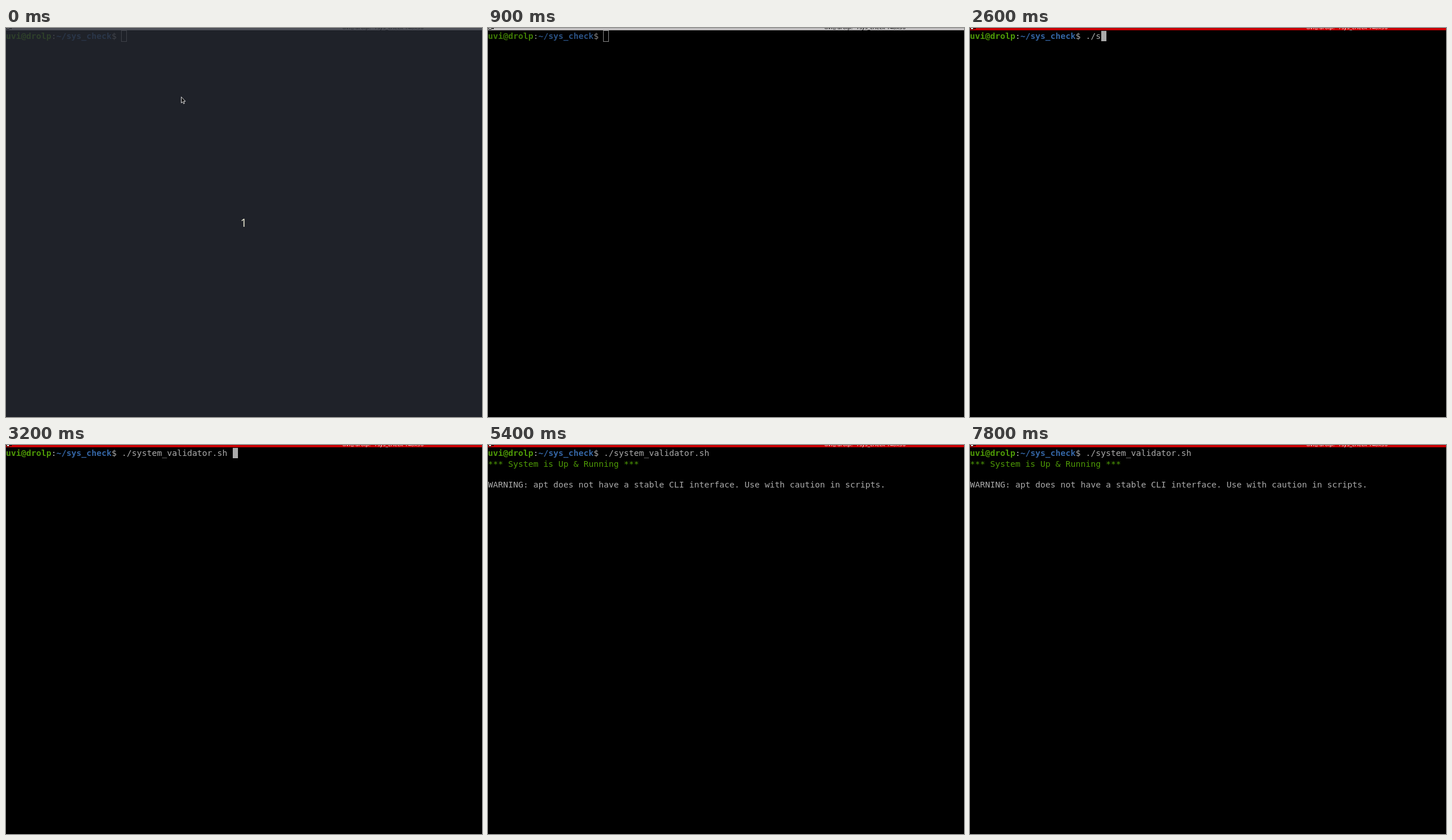
Recreate the animation shown at these times as an HTML page. Size 827 by 677 pixels, loop 8 s.

```html
<!DOCTYPE html>
<html lang="en">
<head>
<meta charset="utf-8">
<title>Terminal</title>
<style>
  html, body { margin: 0; width: 100%; height: 100%; overflow: hidden; background: #000; }
  svg { display: block; width: 827px; height: 677px; }
  .term text { font: 14.53px "DejaVu Sans Mono", "Noto Sans Mono", monospace; white-space: pre; fill: #aaa; }
  .term .user { fill: #4e9a06; font-weight: 700; }
  .term .path { fill: #3465a4; font-weight: 700; }
  .term .ok { fill: #4e9a06; }
  .bar { fill: #c80003; }
  .title { font: 9.8px "Open Sans", "Noto Sans", sans-serif; text-anchor: middle; fill: #fff; }
  .mark { fill: #fff; stroke: #300; }
  .idle .bar { fill: #c0bebf; }
  .idle .title { fill: #000; }
  .idle .mark { fill: #ddd; stroke: #000; }
  .idle .term text { fill: #888; }
  .idle .term .user { fill: #3e7b05; }
  .idle .term .path { fill: #2a5183; }
  .count { font: 20px "Noto Sans", "Open Sans", sans-serif; text-anchor: middle; fill: #e4e4cf; }
</style>
</head>
<body>
<svg viewBox="0 0 827 677">
  <g id="win">
    <rect width="827" height="677"/>
    <rect class="bar" width="827" height="4"/>
    <rect class="mark" x="1.5" y="-2.5" width="4" height="5"/>
    <path d="M6.5 0h4l-2 2.5z"/>
    <text class="title" x="655" y="2.4">uvi@drolp: ~/sys_check 148x56</text>
    <g class="term">
      <text y="19.4"><tspan class="user">uvi@drolp</tspan>:<tspan class="path">~/sys_check</tspan>$ <tspan id="cmd"></tspan></text>
      <text id="status" class="ok" y="37.6">*** System is Up &amp; Running ***</text>
      <text id="warn" y="74">WARNING: apt does not have a stable CLI interface. Use with caution in scripts.</text>
      <rect id="cursor"/>
    </g>
  </g>
  <g id="veil">
    <rect width="827" height="677" fill="#292d36" fill-opacity=".76"/>
    <text class="count" x="413" y="346">1</text>
  </g>
  <path id="mouse" d="M.5.8v10.7l2.4-2.2 1.6 3.6 1.7-.8-1.6-3.5h3.2z" fill="#111" stroke="#d8d8d8"/>
</svg>
<script>
  const LOOP = 8000, CELL = 8.75, ROW = 18.2, TOP = 5, PROMPT = 23;
  const COMMAND = './system_validator.sh ';
  // [time, characters entered]
  const typing = [[2000, 1], [2200, 2], [2600, 3], [2900, 4], [3000, 5], [3200, COMMAND.length]];
  const el = id => document.getElementById(id);
  const [win, cmd, status, warn, cursor, veil, mouse] =
    ['win', 'cmd', 'status', 'warn', 'cursor', 'veil', 'mouse'].map(el);

  const show = (node, on) => node.setAttribute('visibility', on ? 'visible' : 'hidden');
  const set = (node, attrs) => {
    for (const key in attrs) node.setAttribute(key, attrs[key]);
  };

  function placeCursor(col, row, hollow) {
    const inset = hollow ? .5 : 0;
    set(cursor, {
      x: Math.round(col * CELL) + inset - (hollow ? 1 : 0),
      y: Math.round(TOP + row * ROW) + inset - (hollow ? 1 : 0),
      width: 9, height: 18 + inset * 2,
      fill: hollow ? 'none' : '#aaa',
      stroke: hollow ? '#888' : 'none'
    });
  }

  function draw(t) {
    const focused = t >= 1500;
    const typed = typing.reduce((n, [at, count]) => t >= at ? count : n, 0);
    win.setAttribute('class', focused ? '' : 'idle');
    cmd.textContent = COMMAND.slice(0, typed);
    show(veil, t < 100);
    show(status, t >= 3700);
    show(warn, t >= 4300);

    show(mouse, t < 900);
    mouse.setAttribute('transform', t < 800 ? 'translate(304 119)' : 'translate(320 115)');

    if (t < 3700) placeCursor(PROMPT + typed, 0, !focused);
    else placeCursor(0, t < 4300 ? 2 : 5, false);
    show(cursor, t < 4200 || Math.floor((t - 4200) / 600) % 2 === 1);
  }

  function tick() {
    draw(performance.now() % LOOP);
    requestAnimationFrame(tick);
  }
  tick();
</script>
</body>
</html>
```
